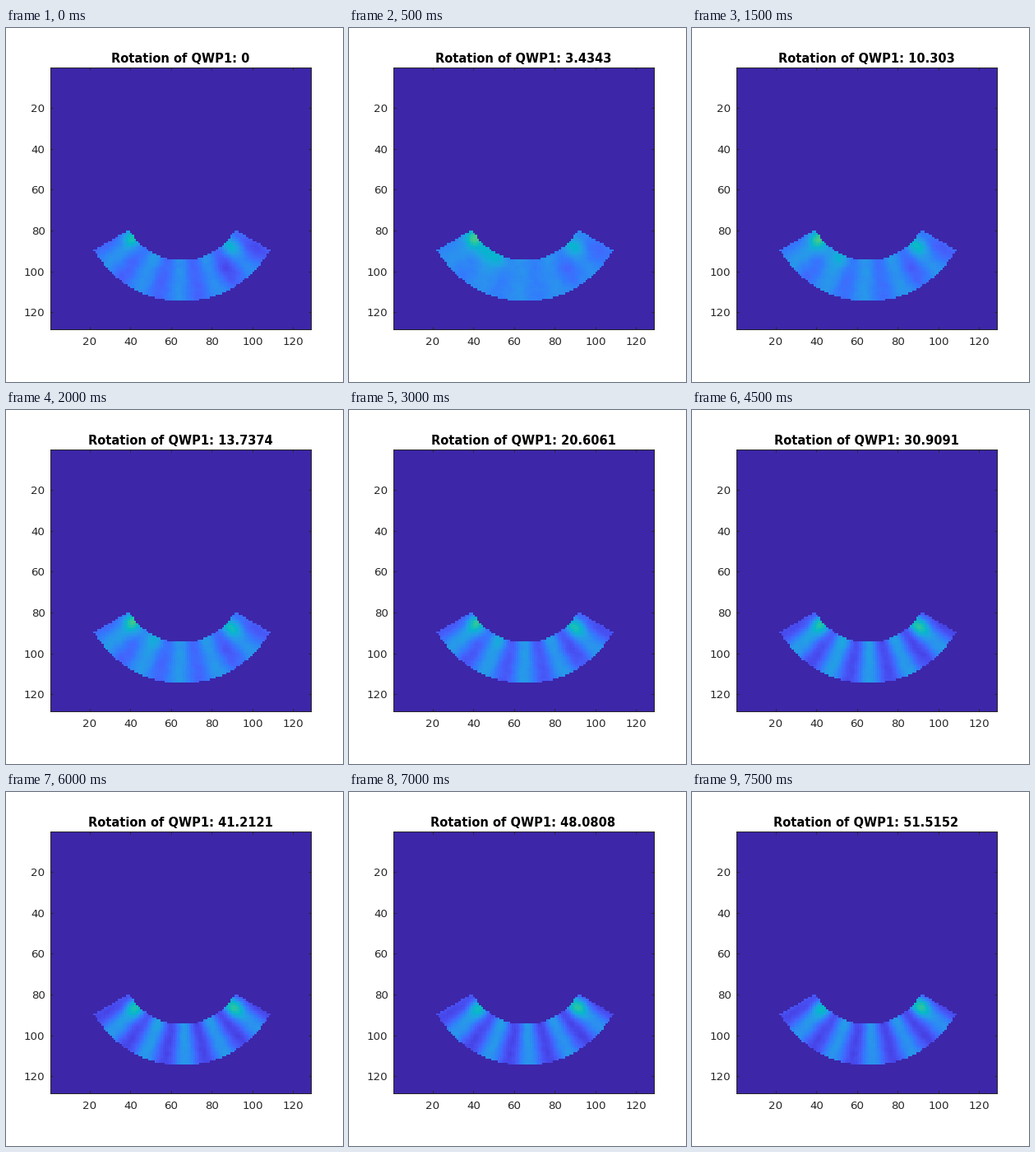
A matplotlib script for the animation above (8 s loop, 410 by 430 pixels).

```python
import numpy as np
import matplotlib.pyplot as plt
from matplotlib.animation import FuncAnimation
from matplotlib.colors import LinearSegmentedColormap

W, H, DPI = 410, 430, 100
FRAMES, INTERVAL = 16, 500
N = 128
LEVELS = 44

plt.rcParams["font.family"] = "DejaVu Sans"

parula = LinearSegmentedColormap.from_list("parula", [
    (0.2422, 0.1504, 0.6603), (0.2706, 0.2147, 0.8364),
    (0.2813, 0.3006, 0.9414), (0.2699, 0.3892, 0.9906),
    (0.1963, 0.4847, 0.9892), (0.1687, 0.5703, 0.9359),
    (0.1248, 0.6459, 0.8883), (0.0297, 0.7082, 0.8163),
    (0.0964, 0.7500, 0.7120), (0.2161, 0.7843, 0.5923),
    (0.3909, 0.8029, 0.4354), (0.5044, 0.7993, 0.3480),
], N=256)

# Cell coordinates around the centre of the ring sector
y, x = np.mgrid[1:N + 1, 1:N + 1] - 65.0
r = np.hypot(x, y)
theta = np.degrees(np.arctan2(x, y))
sector = (r >= 29.95) & (r < 49.8) & (y >= np.abs(x) * np.tan(np.pi / 6))

rng = np.random.default_rng(4)
noise = rng.normal(0, 1, (N, N))
noise = sum(np.roll(noise, (i, j), (0, 1))
            for i in (-1, 0, 1) for j in (-1, 0, 1)) / 3

# Field parameters at chosen steps, linear in between
STEPS = [0, 1, 4, 6, 9, 12, 15]
TRACKS = {
    "mean":  [16, 18.3, 17, 16, 15, 14.2, 13.8],
    "amp":   [3.8, 1.6, 4.4, 5.8, 7.2, 7.2, 6.8],
    "shift": [-2, -4, -1.8, -0.5, 0.8, 1.8, 2.6],
    "left":  [13, 16, 14, 12.5, 11, 11, 9],
    "right": [8, 9, 10, 11, 13, 14, 15],
    "glow":  [2, 9, 5, 4, 3, 2.5, 1.5],
    "dark":  [5, 4, 3, 2.5, 1.5, 1, 1],
}


def blob(cx, cy, size):
    return np.exp(-((x - cx) ** 2 + (y - cy) ** 2) / (2 * size ** 2))


def field(k):
    p = {name: np.interp(k, STEPS, v) for name, v in TRACKS.items()}
    drift = k / (FRAMES - 1)
    v = p["mean"] + p["amp"] * np.cos(2 * np.pi * (theta - p["shift"]) / 23.7)
    v += p["left"] * blob(-25 + 2 * drift, 18.5 + 3.5 * drift, 3.2)
    v += p["right"] * blob(24.2 + 1.8 * drift, 23 - 1.8 * drift, 3.4)
    v += p["glow"] * (blob(-20, 25, 4) + 0.7 * blob(-13, 29, 4))
    v -= p["dark"] * (blob(21, 34, 4) + blob(35, 25, 4.5))
    v += 0.45 * noise
    return np.where(sector, np.clip(v, 3, LEVELS), 0)


def title_text(k):
    angle = f"{k * 340 / 99:.4f}".rstrip("0").rstrip(".")
    return f"Rotation of QWP1: {angle or 0}"


# The small surplus keeps the pixel width from rounding down
fig = plt.figure(figsize=((W + 0.01) / DPI, (H + 0.01) / DPI), dpi=DPI,
                 facecolor="white")
ax = fig.add_axes([53.5 / W, 1 - 366.5 / H, 317 / W, 318 / H])
image = ax.imshow(field(0), cmap=parula, vmin=0, vmax=LEVELS, aspect="auto",
                  interpolation="nearest",
                  extent=(0.5, N + 0.5, N + 0.5, 0.5))

INK = "#262626"
ticks = range(20, 121, 20)
ax.set_xticks(ticks)
ax.set_yticks(ticks)
ax.tick_params(direction="in", length=2.2, width=0.72, color=INK,
               labelcolor=INK, labelsize=9.6, top=True, right=True)
ax.tick_params(axis="x", pad=6.3)
ax.tick_params(axis="y", pad=4.3)
for spine in ax.spines.values():
    spine.set(color=INK, linewidth=0.72)

title = fig.text(212 / W, 1 - 42 / H, title_text(0), ha="center",
                 va="baseline", fontsize=10.56, weight="bold", color="black")


def update(k):
    image.set_data(field(k))
    title.set_text(title_text(k))
    return image, title


anim = FuncAnimation(fig, update, frames=FRAMES, interval=INTERVAL,
                     repeat=True, repeat_delay=0)
plt.show()
```
